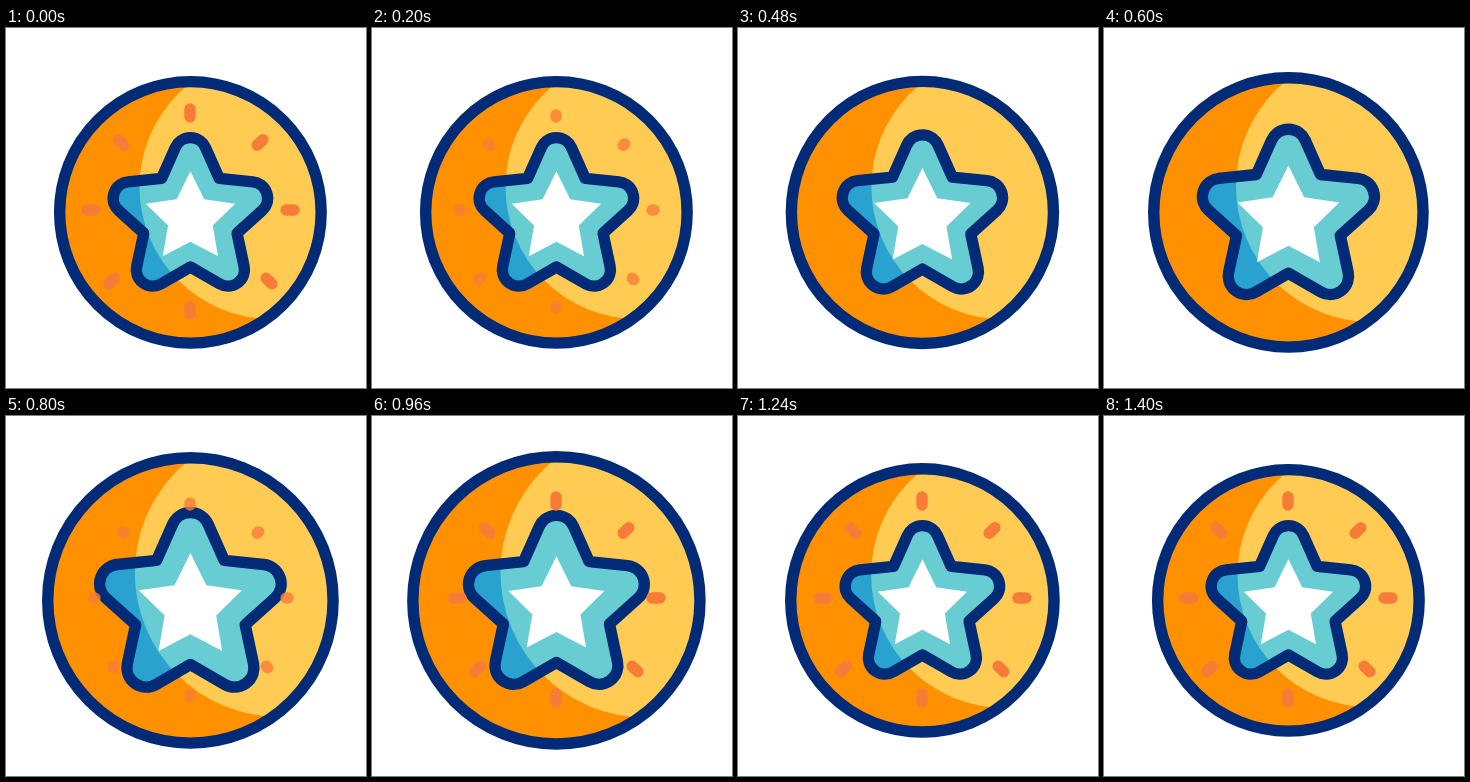
Animation, 360 px wide and 360 px high, one loop 1.44 s. Source, as an HTML page with a canvas:

```html
<!DOCTYPE html>
<html lang="en">
<head>
<meta charset="utf-8">
<title>Star badge</title>
<style>
  html, body { margin: 0; width: 100%; height: 100%; overflow: hidden; background: #fff; }
  canvas { display: block; width: 360px; height: 360px; }
</style>
</head>
<body>
<canvas id="stage" width="360" height="360"></canvas>
<script>
const ctx = document.getElementById('stage').getContext('2d');
const LOOP = 1440, STEP = 40, TAU = Math.PI * 2;
const CENTER = 184.4, LINE = 11.4;
const NAVY = '#012a77', ORANGE = '#ff9000', YELLOW = '#ffcb52';
const TEAL = '#68cdd2', BLUE = '#2aa2cf', DASH = '#f77c38';

// Dash centres with the direction that points outwards, in degrees
const dashes = [
  [184, 85, -90], [254, 114.5, -45], [284, 182, 0], [263, 253, 45],
  [184, 282, 90], [105.5, 253, 135], [85, 182, 180], [115, 114.5, -135]
];

const ramp = (t, from, to) => Math.min(1, Math.max(0, (t - from) / (to - from)));
const ease = x => x * x * (3 - 2 * x);
const swell = (t, rise, peak, fall, rest) => ease(ramp(t, rise, peak)) - ease(ramp(t, fall, rest));

function scaled(scale, draw) {
  ctx.save();
  ctx.translate(CENTER, CENTER);
  ctx.scale(scale, scale);
  ctx.translate(-CENTER, -CENTER);
  draw();
  ctx.restore();
}

function disc(x, y, r) {
  ctx.beginPath();
  ctx.arc(x, y, r, 0, TAU);
}

function starPath(cy, tip, notch, cornerRadius) {
  const point = i => {
    const r = i % 2 ? notch : tip;
    const a = (i * 36 - 90) * Math.PI / 180;
    return [CENTER + r * Math.cos(a), cy + r * Math.sin(a)];
  };
  ctx.beginPath();
  ctx.moveTo(...point(-1));
  for (let i = 0; i < 10; i += 2) {
    ctx.arcTo(...point(i), ...point(i + 1), cornerRadius);
    ctx.lineTo(...point(i + 1));
  }
  ctx.closePath();
}

const coinPath = () => disc(CENTER, CENTER, 130.75);
const badgePath = () => starPath(190, 104.5, 49, 16.5);
const corePath = () => starPath(190.2, 47, 23.5, 0);

// Two-tone shape with an outline whose width does not scale
function drawShaded(path, scale, dark, light, coinScale) {
  ctx.save();
  scaled(scale, path);
  ctx.clip();
  ctx.fillStyle = dark;
  ctx.fillRect(0, 0, 360, 360);
  scaled(coinScale, () => disc(265.5, 159, 132));
  ctx.fillStyle = light;
  ctx.fill();
  ctx.restore();

  scaled(scale, path);
  ctx.strokeStyle = NAVY;
  ctx.lineWidth = LINE;
  ctx.lineJoin = 'round';
  ctx.stroke();
}

// Dashes retract to their inner end and later grow back out
function drawDashes(t) {
  const leaving = t < 500;
  const grown = leaving ? 1 - ease(ramp(t, 40, 280)) : ease(ramp(t, 720, 960));
  const alpha = leaving ? 1 - ramp(t, 180, 280) : ramp(t, 720, 820);
  if (alpha <= 0) return;
  ctx.save();
  ctx.globalAlpha = alpha;
  ctx.strokeStyle = DASH;
  ctx.lineWidth = LINE;
  ctx.lineCap = 'round';
  for (const [x, y, degrees] of dashes) {
    const a = degrees * Math.PI / 180, dx = Math.cos(a), dy = Math.sin(a);
    const outer = -4 + 8 * grown + 0.01;
    ctx.beginPath();
    ctx.moveTo(x - 4 * dx, y - 4 * dy);
    ctx.lineTo(x + outer * dx, y + outer * dy);
    ctx.stroke();
  }
  ctx.restore();
}

function draw(t) {
  ctx.fillStyle = '#fff';
  ctx.fillRect(0, 0, 360, 360);
  const coinScale = 1 + 0.1 * swell(t, 440, 880, 930, 1300);
  const starScale = 1 + 0.175 * swell(t, 360, 760, 850, 1220);
  const coreScale = 1 + 0.155 * swell(t, 280, 680, 770, 1140);
  drawShaded(coinPath, coinScale, ORANGE, YELLOW, coinScale);
  drawShaded(badgePath, starScale, BLUE, TEAL, coinScale);
  scaled(coreScale, corePath);
  ctx.fillStyle = '#fff';
  ctx.fill();
  drawDashes(t);
}

const start = performance.now();
function tick() {
  const t = (performance.now() - start) % LOOP;
  draw(Math.floor(t / STEP) * STEP);
  requestAnimationFrame(tick);
}
tick();
</script>
</body>
</html>
```
